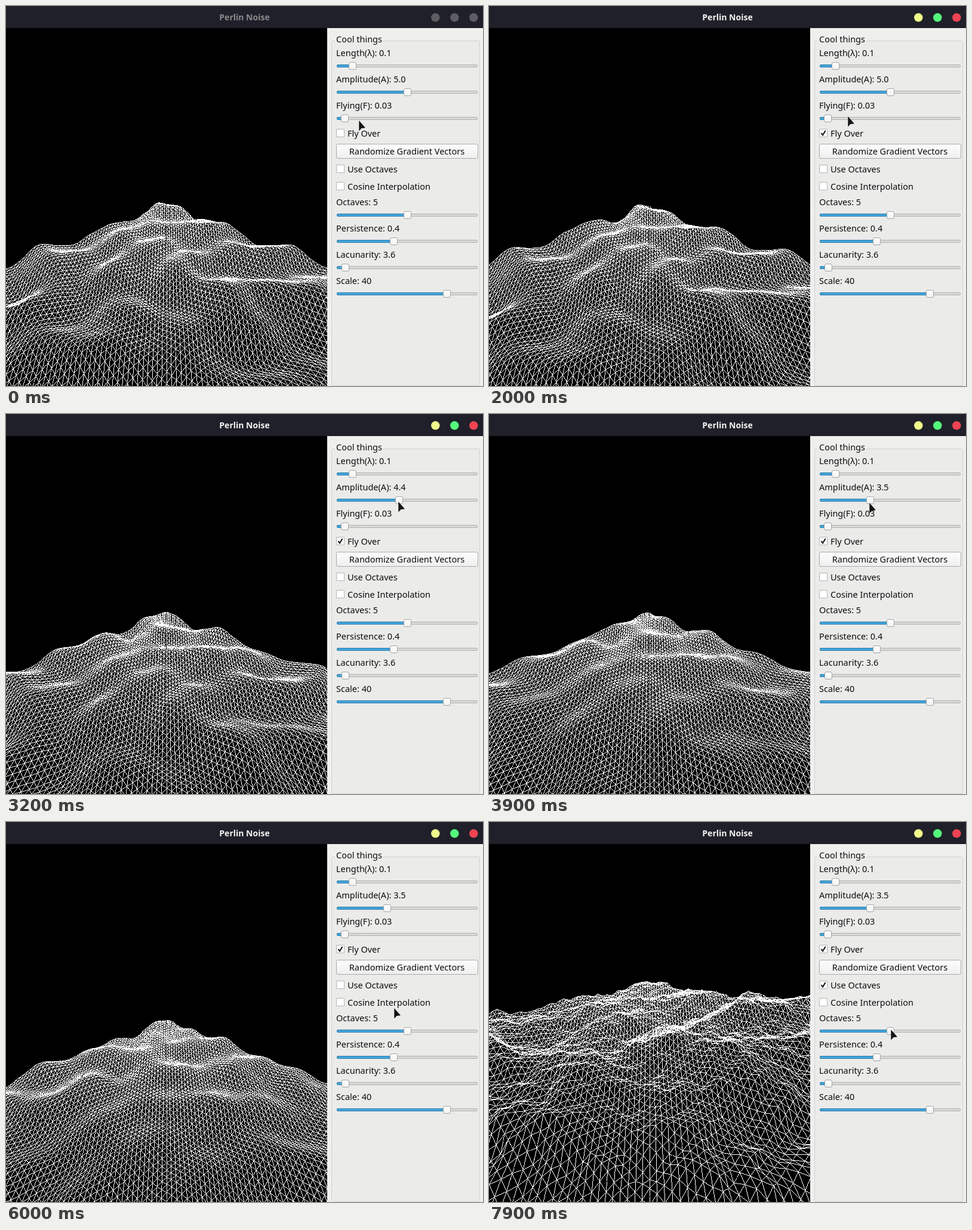
These frames come from a looping animation (799 by 637 pixels, 8000 ms). An HTML page with a canvas:

```html
<!DOCTYPE html>
<html lang="en">
<head>
<meta charset="utf-8">
<title>Perlin Noise</title>
<style>
html, body { margin: 0; width: 100%; height: 100%; overflow: hidden; background: #000; }
canvas { display: block; width: 100vw; height: 100vh; }
</style>
</head>
<body>
<canvas id="stage" width="799" height="637"></canvas>
<script>
const ctx = document.getElementById('stage').getContext('2d');
const LOOP = 8000, STEP = 100;
const VIEW = { x: 0, y: 37, w: 538, h: 600 };
const FAMILY = '"Noto Sans", "Open Sans", sans-serif';

// ---------- terrain ----------

const mix = (a, b, t) => a + (b - a) * t;
const fade = t => t * t * t * (t * (t * 6 - 15) + 10);

function grad(i, j, x, y) {
  const s = Math.sin(i * 127.1 + j * 311.7) * 43758.5453;
  const a = (s - Math.floor(s)) * Math.PI * 2;
  return Math.cos(a) * x + Math.sin(a) * y;
}

function perlin(x, y) {
  const i = Math.floor(x), j = Math.floor(y), u = x - i, v = y - j, f = fade(u);
  return mix(
    mix(grad(i, j, u, v), grad(i + 1, j, u - 1, v), f),
    mix(grad(i, j + 1, u, v - 1), grad(i + 1, j + 1, u - 1, v - 1), f),
    fade(v));
}

const smoothHeight = (x, y, amp) => 0.6 + 0.75 * amp * perlin(x / 7, y / 7);

// A high plateau, raised to the sides, with one wavy ridge and three finer octaves.
function octaveHeight(x, y) {
  const m = (x + y) * Math.SQRT1_2, l = (y - x) * Math.SQRT1_2;
  const ridge = 34 - 0.021 * (l + 12) ** 2 + 5 * perlin(x / 9 + 40, y / 9);
  const u = (m - ridge) / 4;
  let h = 9.6 + 0.13 * Math.hypot(l, 4) + 0.04 * l + 2 * u * Math.exp(-u * u / 2);
  for (let size = 7.8, amp = 2.6; size > 0.5; size /= 3.6, amp *= 0.4) {
    h += amp * perlin(x / size, y / size);
  }
  return h;
}

// ---------- wireframe ----------

const GRID = 82, CELL = 0.7;
const CAM = { dist: 70, focal: 466, sin: 0.39, cos: 0.92, x: 269, y: 300 };
const image = ctx.createImageData(VIEW.w, VIEW.h);
const pixels = new Uint32Array(image.data.buffer);
const px = new Float32Array(GRID * GRID), py = new Float32Array(GRID * GRID);
const ok = new Uint8Array(GRID * GRID);

function line(a, b) {
  if (!ok[a] || !ok[b]) return;
  const W = VIEW.w, H = VIEW.h;
  const ax = px[a], ay = py[a], bx = px[b], by = py[b];
  if ((ax < 0 && bx < 0) || (ay < 0 && by < 0) || (ax >= W && bx >= W) || (ay >= H && by >= H)) return;
  const n = Math.max(1, Math.round(Math.max(Math.abs(bx - ax), Math.abs(by - ay))));
  const dx = (bx - ax) / n, dy = (by - ay) / n;
  for (let k = 0; k <= n; k++) {
    const x = Math.floor(ax + dx * k), y = Math.floor(ay + dy * k);
    if (x >= 0 && x < W && y >= 0 && y < H) pixels[y * W + x] = 0xffffffff;
  }
}

function buildMesh(height) {
  pixels.fill(0xff000000);
  for (let i = 0, k = 0; i < GRID; i++) {
    for (let j = 0; j < GRID; j++, k++) {
      const x = i * CELL, y = j * CELL, z = height(x, y);
      const m = (x + y) * Math.SQRT1_2, l = (y - x) * Math.SQRT1_2;
      const depth = CAM.dist - CAM.cos * m - CAM.sin * z;
      ok[k] = depth > 4 ? 1 : 0;
      px[k] = CAM.x + CAM.focal * l / depth;
      py[k] = CAM.y + CAM.focal * (CAM.sin * m - CAM.cos * z) / depth;
    }
  }
  for (let i = 0; i < GRID; i++) {
    for (let j = 0; j < GRID; j++) {
      const k = i * GRID + j, inI = i < GRID - 1, inJ = j < GRID - 1;
      if (inI) line(k, k + GRID);
      if (inJ) line(k, k + 1);
      if (inI && inJ) line(k, k + GRID + 1);
    }
  }
}

let meshKey = '';
function drawTerrain(s) {
  const key = [s.flown, s.amp, s.rough].join();
  if (key !== meshKey) {
    meshKey = key;
    if (s.rough) {
      const lead = 1.2 * (64 - s.flown);
      buildMesh((x, y) => octaveHeight(x + lead, y + lead));
    } else {
      const shift = 0.3 * s.flown;
      buildMesh((x, y) => smoothHeight(x - shift, y - shift, s.amp));
    }
  }
  ctx.putImageData(image, VIEW.x, VIEW.y);
}

// ---------- state by time ----------

// Pointer key points: time, x, y.
const PATH = [
  [500, 591, 192], [700, 576, 204], [800, 576, 204], [1100, 559, 215], [1600, 559, 215],
  [2600, 663, 140], [2900, 669, 146], [3700, 637, 148], [4100, 637, 150], [4600, 755, 235],
  [5100, 637, 295], [5900, 640, 296], [6200, 669, 345], [6900, 588, 284], [7100, 559, 271],
  [7300, 559, 271], [7800, 673, 348]
];

function pointerAt(t) {
  const n = PATH.findIndex(p => p[0] > t);
  if (n < 0) return PATH[PATH.length - 1].slice(1);
  if (n === 0) return PATH[0].slice(1);
  const a = PATH[n - 1], b = PATH[n], f = (t - a[0]) / (b[0] - a[0]);
  return [mix(a[1], b[1], f), mix(a[2], b[2], f)];
}

function stateAt(t) {
  const k = Math.floor(t / STEP);
  const drag = Math.min(1, Math.max(0, (k - 29) / 8));
  return {
    k,
    pointer: pointerAt(k * STEP),
    amp: Math.round(50 - 15 * drag) / 10,
    active: k >= 15,
    octaves: k >= 71,
    rough: k >= 73,
    flown: k < 15 ? 0 : k - 14 - (k >= 72 ? 1 : 0)
  };
}

// ---------- widgets ----------

function box(x, y, w, h, r, fill, stroke) {
  ctx.beginPath();
  ctx.roundRect(x + 0.5, y + 0.5, w - 1, h - 1, r);
  ctx.fillStyle = fill;
  ctx.fill();
  ctx.strokeStyle = stroke;
  ctx.lineWidth = 1;
  ctx.stroke();
}

function shade(y, h, top, bottom) {
  const g = ctx.createLinearGradient(0, y, 0, y + h);
  g.addColorStop(0, top);
  g.addColorStop(1, bottom);
  return g;
}

function label(text, x, y, align = 'left') {
  ctx.font = '14.5px ' + FAMILY;
  ctx.textAlign = align;
  ctx.fillStyle = '#0c0c0c';
  ctx.fillText(text, x, y + 5);
}

function slider(text, y, x) {
  label(text, 553, y);
  const cy = y + 21;
  box(554, cy - 2, 236, 5, 1.5, '#d9d9d8', '#b1b1b0');
  box(554, cy - 2, x - 554, 5, 1.5, '#43a5dc', '#2f7ca8');
  box(x - 6, cy - 6, 13, 13, 2.5, shade(cy - 6, 13, '#ffffff', '#f1f1f0'), '#a5a5a4');
}

function check(text, y, on) {
  box(553, y - 7, 14, 14, 0.5, '#ffffff', '#b5b5b4');
  if (on) {
    ctx.beginPath();
    ctx.moveTo(556.5, y);
    ctx.lineTo(559, y + 3.5);
    ctx.lineTo(563.5, y - 4);
    ctx.strokeStyle = '#0a0a0a';
    ctx.lineWidth = 2;
    ctx.stroke();
  }
  label(text, 572, y + 1);
}

function drawTitle(active) {
  ctx.fillStyle = '#20202a';
  ctx.fillRect(0, 0, 799, 37);
  ctx.font = 'bold 14px ' + FAMILY;
  ctx.textAlign = 'center';
  ctx.fillStyle = active ? '#f4f4f4' : '#8b8b8d';
  ctx.fillText('Perlin Noise', 399.5, 24);
  const colours = active ? ['#f0fb8c', '#53fa7c', '#ee4453'] : Array(3).fill('#5d5d63');
  colours.forEach((c, n) => {
    ctx.beginPath();
    ctx.arc(719.3 + 32 * n, 19.3, 7.2, 0, Math.PI * 2);
    ctx.fillStyle = c;
    ctx.fill();
  });
}

function drawPanel(s) {
  ctx.fillStyle = '#efefee';
  ctx.fillRect(538, 37, 261, 600);
  box(545, 58, 249, 579, 2, '#ebebea', '#d2d2d1');
  ctx.fillStyle = '#eeeeed';
  ctx.fillRect(551, 56, 81, 4);
  label('Cool things', 553, 56);
  slider('Length(λ): 0.1', 79, 580);
  slider('Amplitude(A): ' + s.amp.toFixed(1), 123, Math.floor(561 + 22.2 * s.amp));
  slider('Flying(F): 0.03', 167, 567);
  check('Fly Over', 213, s.active);
  box(553, 231, 238, 25, 2.5, shade(231, 25, '#fdfdfd', '#eeeeed'), '#a9a9a8');
  label('Randomize Gradient Vectors', 671.5, 244, 'center');
  check('Use Octaves', 273, s.octaves);
  check('Cosine Interpolation', 302, false);
  slider('Octaves: 5', 329, 672);
  slider('Persistence: 0.4', 373, 649);
  slider('Lacunarity: 3.6', 417, 568);
  slider('Scale: 40', 461, 738);
}

function drawPointer([x, y]) {
  ctx.save();
  ctx.translate(Math.round(x), Math.round(y));
  ctx.beginPath();
  ctx.moveTo(0.3, 0);
  ctx.lineTo(0.3, 17.5);
  ctx.lineTo(4.5, 13);
  ctx.lineTo(11, 12.2);
  ctx.closePath();
  ctx.strokeStyle = 'rgba(255,255,255,0.3)';
  ctx.lineWidth = 1;
  ctx.stroke();
  ctx.fillStyle = '#141414';
  ctx.fill();
  ctx.restore();
}

let shown = -1;
function frame(now) {
  const s = stateAt(now % LOOP);
  if (s.k !== shown) {
    shown = s.k;
    drawTitle(s.active);
    drawTerrain(s);
    drawPanel(s);
    drawPointer(s.pointer);
  }
  requestAnimationFrame(() => frame(performance.now() - start));
}

const start = performance.now();
frame(0);
</script>
</body>
</html>
```
